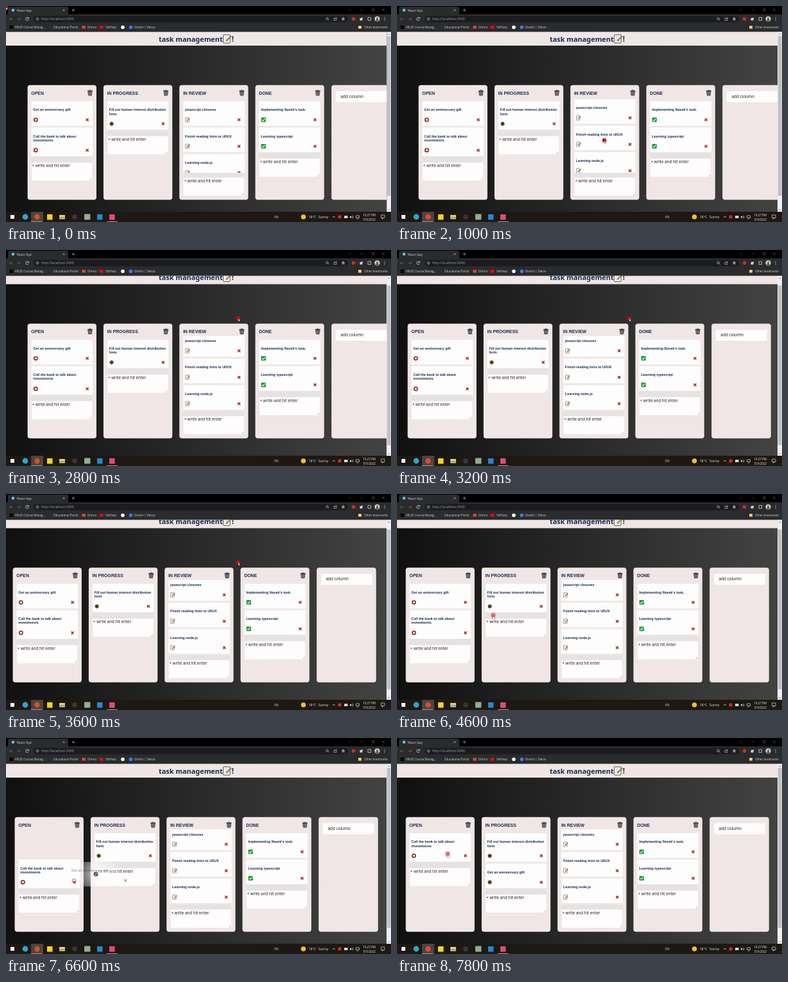
Recreate the animation shown at these times as an HTML page with a canvas. Size 600x338 px, loop 8 s.

```html
<!DOCTYPE html>
<html lang="en">
<head>
<meta charset="utf-8">
<title>Task board</title>
<style>
html, body { margin: 0; width: 100%; height: 100%; overflow: hidden; background: #000; }
canvas { display: block; width: 600px; height: 338px; }
</style>
</head>
<body>
<canvas id="stage"></canvas>
<script>
const LOOP = 8000, STEP = 200;
const SANS = '"Liberation Sans", Arial, sans-serif';
const HAND = '"Comic Sans MS", "Noto Sans", sans-serif';
const UI = '"Open Sans", "Noto Sans", sans-serif';
const PANEL = '#f0e6e6', INK = '#172b4d';
const EDGE = 593.3; // right side of the page, where the scrollbar starts

const canvas = document.getElementById('stage');
const dpr = window.devicePixelRatio || 1;
canvas.width = 600 * dpr;
canvas.height = 338 * dpr;
const g = canvas.getContext('2d');

// ---- drawing helpers
function box(x, y, w, h, color, r = 0) {
  g.fillStyle = color;
  g.beginPath();
  g.roundRect(x, y, w, h, r);
  g.fill();
}
function frame(x, y, w, h, color, lw = 0.7, r = 0) {
  g.strokeStyle = color;
  g.lineWidth = lw;
  g.beginPath();
  g.roundRect(x, y, w, h, r);
  g.stroke();
}
function dot(x, y, r, color) {
  g.fillStyle = color;
  g.beginPath();
  g.arc(x, y, r, 0, 7);
  g.fill();
}
function ring(x, y, r, color, lw = 0.8, from = 0, to = 7) {
  g.strokeStyle = color;
  g.lineWidth = lw;
  g.beginPath();
  g.arc(x, y, r, from, to);
  g.stroke();
}
function line(color, lw, ...p) {
  g.strokeStyle = color;
  g.lineWidth = lw;
  g.beginPath();
  for (let i = 0; i < p.length; i += 2) g.lineTo(p[i], p[i + 1]);
  g.stroke();
}
function text(str, x, y, size, color, font = UI, weight = 400, align = 'left') {
  g.font = `${weight} ${size}px ${font}`;
  g.textAlign = align;
  g.textBaseline = 'alphabetic';
  g.fillStyle = color;
  g.fillText(str, x, y);
}
function cross(x, y, r, color, lw) {
  line(color, lw, x - r, y - r, x + r, y + r);
  line(color, lw, x + r, y - r, x - r, y + r);
}

// ---- motion: rows of [time, value...], eased between rows
function track(t, rows) {
  let i = 0;
  while (i < rows.length - 1 && rows[i + 1][0] <= t) i++;
  const a = rows[i], b = rows[i + 1] || a;
  const k = b === a ? 0 : (t - a[0]) / (b[0] - a[0]);
  const e = k * k * (3 - 2 * k);
  return a.slice(1).map((v, n) => v + (b[n + 1] - v) * e);
}
const pointerPath = [[0, 0, 2], [800, 322, 212], [1400, 326, 206], [1800, 362, 107.5],
  [3600, 362, 107.5], [4600, 150, 190], [5200, 85, 197], [5600, 60.5, 168], [6000, 60.5, 168],
  [6600, 140, 213], [7000, 190, 196], [7200, 180, 190], [7800, 79, 181.5]];
const listPath = [[0, 0], [800, 0], [1400, 11.8]];
const pagePath = [[0, 0], [2000, 0], [2400, 8.5], [4800, 8.5], [5200, 2.5], [5400, 0]];
const boardPath = [[0, 0], [2800, 0], [3400, 23], [4000, 23], [4400, 20]];
const DRAG = 6000, DROP = 7000;

// ---- board content
const gift = ['Get an anniversary gift'];
const bank = ['Call the bank to talk about', 'investments'];
const form = ['Fill out human interest distribution', 'form'];
const titles = ['OPEN', 'IN PROGRESS', 'IN REVIEW', 'DONE'];
const review = [['javascript closures'], ['Finish reading Intro to UI/UX'], ['Learning node.js']];
const done = [["Implementing Navek's task."], ['Learning typescript']];

function lists(t) {
  return t < DROP ? [[gift, bank], [form], review, done] : [[bank], [form, gift], review, done];
}
const cardHeight = lines => 32.2 + lines.length * 6.2;

function note(x, y, s) {
  box(x, y, s * 0.82, s, '#f8f5ec', s * 0.08);
  frame(x, y, s * 0.82, s, '#444', s * 0.07, s * 0.08);
  for (let i = 1; i < 5; i++)
    line('#b0aeaa', s * 0.04, x + s * 0.14, y + s * i * 0.19, x + s * 0.55, y + s * i * 0.19);
  line('#3a3020', s * 0.16, x + s * 0.4, y + s * 0.72, x + s * 0.95, y + s * 0.15);
  line('#e5b43c', s * 0.09, x + s * 0.45, y + s * 0.67, x + s * 0.92, y + s * 0.18);
}
function gear(x, y) {
  for (let i = 0; i < 8; i++) {
    const a = i * Math.PI / 4;
    line('#2c2a0c', 1, x, y, x + 3.4 * Math.cos(a), y + 3.4 * Math.sin(a));
  }
  dot(x, y, 2.6, '#33300c');
  ring(x, y, 1.6, '#8f7a1e', 0.6);
  dot(x, y, 0.8, '#211c04');
}
function status(col, x, y) {
  if (col === 0) ring(x, y, 2.6, '#8e1f17', 1.6);
  if (col === 1) gear(x, y);
  if (col === 2) note(x - 3.3, y - 3.5, 7);
  if (col === 3) {
    box(x - 3.6, y - 3.5, 7.2, 7, '#169c2d', 0.8);
    line('#fff', 1.1, x - 2, y, x - 0.6, y + 1.7, x + 2.2, y - 1.8);
  }
}
function bin(x, y) {
  g.fillStyle = '#777d80';
  g.beginPath();
  g.moveTo(x - 3.2, y - 2.5);
  g.lineTo(x + 3.2, y - 2.5);
  g.lineTo(x + 2.4, y + 4);
  g.lineTo(x - 2.4, y + 4);
  g.closePath();
  g.fill();
  g.strokeStyle = '#30363a';
  g.lineWidth = 0.7;
  g.stroke();
  for (const d of [-1.3, 0, 1.3]) line('#454b4f', 0.4, x + d, y - 2, x + d, y + 3.5);
  line('#30363a', 1.3, x - 3.9, y - 3, x + 3.9, y - 3);
  line('#30363a', 0.9, x - 1.4, y - 4.2, x + 1.4, y - 4.2);
}
function cardInner(lines, col, x, y) {
  lines.forEach((s, i) => text(s, x + 2.7, y + 15.4 + i * 6.2, 5.38, INK, SANS, 700));
  const iy = y + 22.9 + lines.length * 6.2;
  status(col, x + 6.7, iy);
  cross(x + 87, iy, 2, '#9c261c', 1.4);
}
function writer(x, y, strip) {
  box(x, y - strip, 95, strip, '#e6e1e2');
  box(x, y, 95, 29, '#fefcfc');
  frame(x, y, 95, 29, '#ecdcdc', 0.5);
  text('+ write and hit enter', x + 1.2, y + 7.5, 6.2, '#222', HAND);
  line('#777', 0.5, x + 91, y + 28, x + 94, y + 25);
  line('#777', 0.5, x + 92.8, y + 28, x + 94, y + 26.8);
}
function column(i, cards, x, t, scroll) {
  box(x, 123.7, 107.3, 179.5, PANEL, 4);
  const left = x + 6, top = scroll ? 143 : 148, limit = 261;
  let y = 149 - scroll;
  g.save();
  g.beginPath();
  g.rect(x, top, 107, limit - top);
  g.clip();
  for (const c of cards) {
    const h = cardHeight(c);
    if (!(c === gift && t >= DRAG && t < DROP)) {
      box(left, y, 95.5, h, '#fefdfd', 1);
      cardInner(c, i, left, y);
    }
    y += h + 2.95;
  }
  g.restore();
  if (i === 2) writer(left, 268.3, 268.3 - limit);
  else writer(left, y + 6.8, 9.3);
  text(titles[i], x + 5.7, 138.5, 6.95, INK, SANS, 700);
  bin(x + 97.3, 136);
}

function page(t) {
  const [scroll] = track(t, pagePath), [shift] = track(t, boardPath), [inner] = track(t, listPath);
  const fade = g.createLinearGradient(0, 0, EDGE, 0);
  fade.addColorStop(0, '#101010');
  fade.addColorStop(1, '#434343');
  g.save();
  g.beginPath();
  g.rect(0, 40.5, EDGE, 281.5);
  g.clip();
  box(0, 40, EDGE, 282, fade);
  g.translate(0, -scroll);
  box(0, 40, EDGE, 22, PANEL);
  text('task management', 238, 55.6, 10.9, INK, HAND, 600);
  note(338.5, 45, 13);
  text('!', 351.8, 55.6, 11.5, INK, HAND, 600);
  lists(t).forEach((cards, i) => column(i, cards, 33.6 + i * 118.3 - shift, t, i === 2 ? inner : 0));
  const x = 507.2 - shift;
  box(x, 123.7, 92.6, 179.5, PANEL, 4);
  box(x + 6.4, 133, 80.5, 18, '#fefcfc', 1);
  frame(x + 6.4, 133, 80.5, 18, '#eddcdc', 0.5, 1);
  text('add column', x + 14.2, 143.8, 6.4, '#222', HAND);
  g.restore();

  box(EDGE, 40.5, 600 - EDGE, 281.5, '#f1f1f1');
  box(EDGE + 0.5, 47 + scroll, 5.6, 250, '#c1c1c1');
  line('#555', 0.8, 595.2, 45, 596.7, 43.5, 598.2, 45);
  line('#555', 0.8, 595.2, 318, 596.7, 319.5, 598.2, 318);
}

// ---- pointer and dragged card
function ghost(x, y) {
  const left = x - 40.8, top = y - 19;
  g.save();
  g.beginPath();
  g.rect(left, top, 95.5, 38.4);
  g.clip();
  const glow = g.createRadialGradient(x, y, 0, x, y, 42);
  glow.addColorStop(0, 'rgba(255,255,255,.75)');
  glow.addColorStop(1, 'rgba(255,255,255,0)');
  box(left, top, 95.5, 38.4, glow);
  g.globalAlpha = 0.4;
  cardInner(gift, 0, left, top);
  g.restore();
}
function polygon(x, y, pts) {
  g.beginPath();
  for (let i = 0; i < pts.length; i += 2) g.lineTo(x + pts[i], y + pts[i + 1]);
  g.closePath();
  g.fillStyle = '#fff';
  g.fill();
  g.strokeStyle = '#222';
  g.lineWidth = 0.4;
  g.stroke();
}
function pointer(t) {
  const [x, y] = track(t, pointerPath);
  if (t >= DRAG && t < DROP) {
    ghost(x, y);
    dot(x, y, 3.4, 'rgba(225,40,45,.55)');
    ring(x, y, 2.8, '#222', 1);
    line('#222', 1, x - 2, y - 2, x + 2, y + 2);
    return;
  }
  const hand = t >= 4600;
  dot(x, y - 0.3, hand ? 3.6 : 3.2, hand ? 'rgba(232,45,50,.65)' : '#c80d14');
  if (hand) polygon(x, y, [-0.6, 0, 0.5, 0, 0.6, 2.2, 2.8, 2.8, 2.6, 5.6, -0.8, 5.6, -2.2, 3.2, -0.6, 3.4]);
  else polygon(x, y, [0, 0, 0, 4.2, 1, 3.4, 1.7, 4.8, 2.3, 4.5, 1.7, 3.1, 3, 3]);
}

// ---- browser window and taskbar
function browser() {
  const pale = '#d4d5d8', dim = '#6c6d70';
  box(0, 0, 600, 14, '#000');
  box(3, 1, 94, 14, '#2a2b2d', 3);
  box(0, 13, 600, 27.5, '#2a2b2d');
  dot(11, 6.5, 2.3, '#5ecbe8');
  text('React App', 17, 8.5, 4.9, pale);
  cross(90, 6.5, 1.4, pale, 0.6);
  line(pale, 0.6, 102.8, 6.5, 107.2, 6.5);
  line(pale, 0.6, 105, 4.3, 105, 8.7);
  line(dim, 0.6, 534.5, 5.5, 536, 7, 537.5, 5.5);
  line(dim, 0.6, 552.5, 6, 556, 6);
  frame(571, 4.5, 3, 3, dim, 0.6);
  cross(588, 6, 1.6, dim, 0.6);

  box(43, 15.5, 490, 10, '#1b1c1f', 5);
  for (const [x, d] of [[8, 1], [20, -1]]) {
    line(dim, 0.8, x - 2.5, 20.3, x + 2.5, 20.3);
    line(dim, 0.8, x - 0.5 * d, 18.2, x - 2.5 * d, 20.3, x - 0.5 * d, 22.4);
  }
  ring(33, 20.3, 2.3, pale, 0.8, 0.3, 5.6);
  line(pale, 0.8, 35.3, 17.5, 35.3, 19.5, 33.3, 19.5);
  ring(49, 20.3, 2, pale, 0.6);
  line(pale, 0.6, 49, 20, 49, 21.4);
  text('http://localhost:3000', 55, 22.3, 5.25, '#a4a5a8');
  ring(500.5, 19.8, 1.7, pale, 0.7);
  line(pale, 0.8, 501.8, 21.1, 503.2, 22.5);
  frame(511, 19, 4, 3.5, pale, 0.6);
  line(pale, 0.7, 513, 20.5, 515.5, 17.7);
  line(pale, 0.6, 525.5, 17.5, 527.2, 22.5, 523, 19.4, 528, 19.4, 523.8, 22.5, 525.5, 17.5);
  dot(541.5, 20.3, 2.7, '#d52b2b');
  box(551.5, 18.7, 4, 4, pale, 0.8);
  dot(555.2, 19.2, 1, pale);
  frame(564, 18, 4.5, 4.5, pale, 0.8);
  dot(578.5, 20.3, 4, '#d9d6d2');
  dot(578.5, 19.2, 1.3, '#4a4542');
  box(576.3, 20.7, 4.4, 2.7, '#4a4542', 1.2);
  for (const y of [18.2, 20.3, 22.4]) dot(590, y, 0.6, pale);

  const marks = [['KRUD Course Manag...', 14], ['Educational Portal', 74], ['Dremo', 127],
    ['VidHarp', 155], ['Orvelin | Dekzo', 199.5], ['Other bookmarks', 558]];
  for (const [label, x] of marks) text(label, x, 35, 4.5, pale);
  box(5.5, 30.5, 5.5, 5.5, '#060606');
  box(66.5, 31, 4.5, 4.5, '#1f2f4c');
  box(118.5, 31, 5.5, 4.5, '#e04438');
  box(145.5, 31, 6, 4.5, '#f00');
  dot(182, 33.2, 2.8, '#fff');
  dot(194.5, 33.2, 2.8, '#3480f0');
  box(549, 31, 5, 4.6, '#f2cf6c', 0.6);
}
function taskbar() {
  box(0, 322, 600, 16, '#1d1812');
  box(39, 322, 19, 16, '#4a453f');
  for (const x of [39, 157]) box(x, 337, 17, 1, '#b39d86');
  box(7, 327, 6, 6, '#fff');
  dot(30, 330, 4.4, '#2ba4dc');
  dot(48.5, 330, 4.2, '#e2493b');
  box(64, 326, 8.5, 8.5, '#f4d51d');
  box(83, 327, 9, 6.5, '#f3cf63', 0.7);
  box(83, 330.2, 9, 1.6, '#4da0d8');
  dot(107, 330, 4, '#33363a');
  box(122, 325.5, 9.5, 9, '#8fae93', 1);
  box(142, 326, 8.5, 8.5, '#2189d5');
  box(161, 326, 8.5, 8.5, '#e04a82');
  text('EN', 418.3, 331.6, 4.8, '#ddd');
  dot(463.5, 330, 3.8, '#f8bd2b');
  text('18°C', 471.5, 332.4, 5.4, '#eee');
  text('Sunny', 486.8, 332.4, 5.4, '#eee');
  line('#ddd', 0.8, 509, 331, 511, 329, 513, 331);
  dot(520, 330, 2.7, '#d42a22');
  box(527, 328.3, 5.5, 3.6, '#ddd', 0.5);
  box(536, 329, 2, 2.4, '#ddd');
  ring(538, 330.2, 1.5, '#ddd', 0.6, -1, 1);
  ring(538, 330.2, 3, '#ddd', 0.6, -1, 1);
  frame(545.5, 328, 5, 3.5, '#ddd', 0.7);
  line('#ddd', 0.6, 546.5, 333, 549.5, 333);
  text('10:27 PM', 576, 328.5, 4.6, '#eee', UI, 400, 'right');
  text('5/5/2022', 576, 335.7, 4.6, '#eee', UI, 400, 'right');
  frame(584.5, 327, 5.5, 4.6, '#ddd', 0.7);
  line('#ddd', 0.7, 586.5, 331.6, 586.5, 333.4, 588.5, 331.6);
}

function draw(now) {
  const t = Math.floor((now % LOOP) / STEP) * STEP;
  g.setTransform(dpr, 0, 0, dpr, 0, 0);
  browser();
  page(t);
  taskbar();
  pointer(t);
  requestAnimationFrame(draw);
}
requestAnimationFrame(draw);
</script>
</body>
</html>
```
